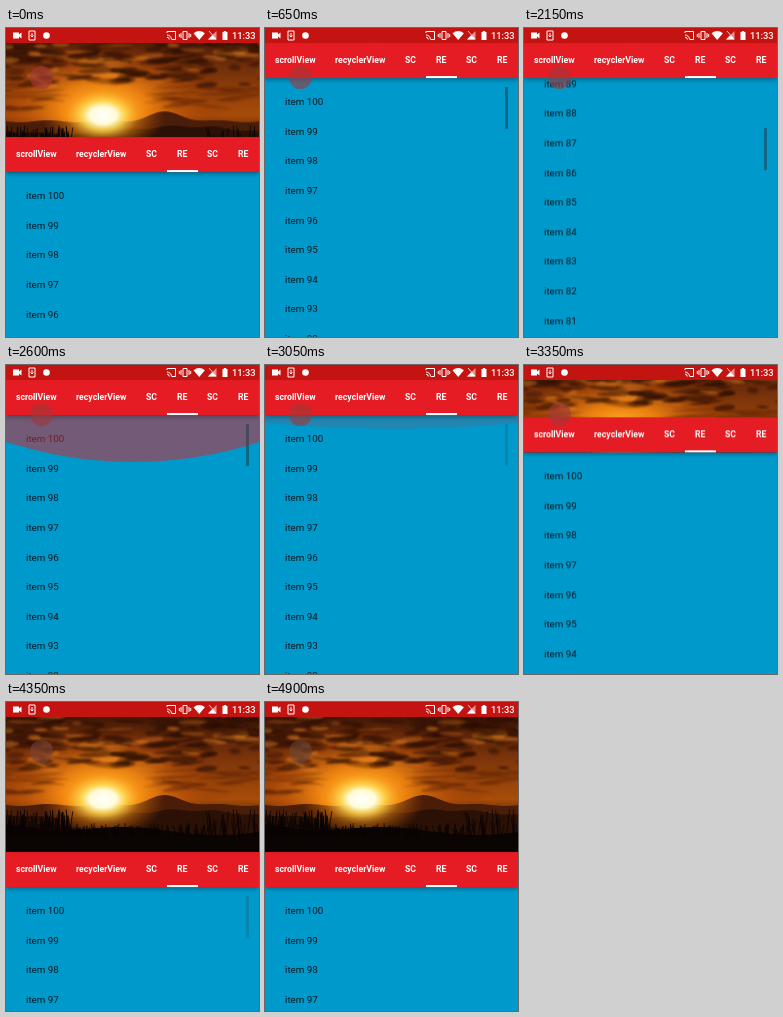
Animation, 253 px wide and 309 px high, one loop 4950 ms. Source, as an HTML page with a canvas:

```html
<!DOCTYPE html>
<html lang="en">
<head>
<meta charset="utf-8">
<title>Collapsing header</title>
<style>
  html, body { margin: 0; width: 100%; height: 100%; overflow: hidden; }
  body { position: relative; background: #000; font-family: Roboto, sans-serif; }
  .stage { position: absolute; left: 0; top: 0; width: 253px; height: 309px; overflow: hidden; }
  .stage * { position: absolute; box-sizing: border-box; }

  .photo, .sheet, .items, .thumb, .glow, .bubble {
    animation: 4950ms linear infinite;
  }
  .photo { left: 0; top: 0; animation-name: parallax; }
  .sheet { left: 0; top: 0; width: 253px; height: 330px; animation-name: slide; }

  .tabs {
    left: 0; top: 0; width: 253px; height: 35px; z-index: 1;
    background: #e51c23; box-shadow: 0 2px 5px rgba(0, 0, 0, .38);
    color: #fff; font-size: 8.7px; font-weight: 700; line-height: 35px;
  }
  .tabs span { top: 0; white-space: nowrap; }
  .tabs i { left: 161px; top: 33px; width: 31px; height: 2px; background: #fff; }

  .list { left: 0; top: 35px; width: 253px; height: 295px; overflow: hidden; background: #0099cc; }
  .items {
    left: 20px; top: 9.3px; color: #0b1a22; font-size: 9.8px; line-height: 29.6px;
    white-space: nowrap; animation-name: scroll;
  }
  .items div { position: static; height: 29.6px; }
  .thumb {
    left: 240px; top: 9px; width: 3px; height: 42px;
    background: rgba(35, 60, 72, .55); animation-name: thumb-move, thumb-fade;
    animation-duration: 4950ms; animation-iteration-count: infinite; animation-timing-function: linear;
  }
  .glow {
    left: 0; top: 0; width: 253px; height: 47px; overflow: hidden;
    transform-origin: top; animation-name: glow;
  }
  .glow div {
    left: -280.5px; bottom: 0; width: 814px; height: 814px;
    border-radius: 50%; background: rgba(229, 28, 35, .5);
  }

  .status { left: 0; top: 0; width: 253px; height: 15px; background: #c41411; }
  .status svg { left: 0; top: 0; }
  .clock { left: 226px; top: 0; color: #fff; font-size: 9.3px; font-weight: 500; line-height: 15px; }
  .bubble {
    left: 23.5px; top: 37.5px; width: 23px; height: 23px; border-radius: 50%;
    animation-name: bubble;
  }

  /* Header: collapse, stay pinned, then pull open again */
  @keyframes slide {
    0% { transform: translateY(110px); animation-timing-function: cubic-bezier(.2, .5, .5, 1); }
    5.05%, 64.65% { transform: translateY(15px); }
    67.68% { transform: translateY(52px); }
    71.72% { transform: translateY(125px); animation-timing-function: ease-out; }
    75.76%, 100% { transform: translateY(150px); }
  }
  @keyframes parallax {
    0% { transform: translateY(-9.5px); animation-timing-function: cubic-bezier(.2, .5, .5, 1); }
    5.05%, 64.65% { transform: translateY(-33px); }
    67.68% { transform: translateY(-24px); }
    71.72% { transform: translateY(-6px); animation-timing-function: ease-out; }
    75.76%, 100% { transform: translateY(0); }
  }
  @keyframes scroll {
    0%, 23.23% { transform: translateY(0); }
    28.28% { transform: translateY(-170px); }
    34.34% { transform: translateY(-335.6px); animation-timing-function: ease-out; }
    41.41% { transform: translateY(-375px); animation-timing-function: ease-in; }
    50.1%, 100% { transform: translateY(0); }
  }
  @keyframes thumb-move {
    0%, 23.23% { transform: translateY(0); }
    28.28% { transform: translateY(20px); }
    34.34% { transform: translateY(40px); animation-timing-function: ease-out; }
    41.41% { transform: translateY(45px); animation-timing-function: ease-in; }
    50.1%, 100% { transform: translateY(0); }
  }
  @keyframes thumb-fade {
    0%, 3.9% { opacity: 0; }
    4%, 13.13% { opacity: 1; }
    18.18%, 23.1% { opacity: 0; }
    23.23%, 58.59% { opacity: 1; }
    63.64%, 73.6% { opacity: 0; }
    73.74%, 84.85% { opacity: 1; }
    89.9%, 100% { opacity: 0; }
  }
  @keyframes glow {
    0%, 50.1% { transform: scaleY(0); opacity: 0; }
    51.5% { transform: scaleY(.8); opacity: .85; }
    52.53%, 54.5% { transform: scaleY(1); opacity: 1; }
    64.6%, 100% { transform: scaleY(0); opacity: 0; }
  }
  @keyframes bubble {
    0%, 82% { background: rgba(160, 55, 58, .6); }
    90%, 99.9% { background: rgba(105, 72, 58, .55); }
    100% { background: rgba(160, 55, 58, .6); }
  }
</style>
</head>
<body>
<div class="stage">
  <canvas class="photo" width="253" height="150"></canvas>

  <div class="sheet">
    <div class="tabs">
      <span style="left:10px">scrollView</span>
      <span style="left:70px">recyclerView</span>
      <span style="left:140px">SC</span>
      <span style="left:171px">RE</span>
      <span style="left:201px">SC</span>
      <span style="left:232px">RE</span>
      <i></i>
    </div>
    <div class="list">
      <div class="items"></div>
      <div class="glow"><div></div></div>
      <div class="thumb"></div>
    </div>
  </div>

  <div class="status">
    <svg width="253" height="15" fill="#fff">
      <path d="M7 4.5h6v2l2.5-2v6l-2.5-2v2H7z"/>
      <g fill="none" stroke="#fff">
        <path d="M23 3h6v9h-6zM26 5v4M24.5 7.5L26 9l1.5-1.5"/>
        <path d="M161 5V3.5h8.5v8H166M161 7a4.5 4.5 0 0 1 4.5 4.5M161 9.2a2.3 2.3 0 0 1 2.3 2.3"/>
        <path d="M177 3.5h4v8h-4zM175 5v5M183 5v5M173.3 6v3M184.7 6v3"/>
        <path d="M203 3l7 8" stroke-width=".8"/>
      </g>
      <circle cx="40.5" cy="7.5" r="3.3"/>
      <path d="M187.5 5.2q5.7-4.4 11.4 0L193.2 12z"/>
      <path d="M210.500 3v8.500h-8.500z" opacity=".55"/>
      <path d="M206 7.500l4.500 4h-8.500z"/>
      <path d="M216.500 4h1.300V3h2.400v1h1.300v8h-5z"/>
    </svg>
    <span class="clock">11:33</span>
  </div>
  <div class="bubble"></div>
</div>

<script>
  const items = document.querySelector('.items');
  for (let n = 100; n > 74; n--) {
    const row = document.createElement('div');
    row.textContent = 'item ' + n;
    items.append(row);
  }

  const ctx = document.querySelector('.photo').getContext('2d');
  let seed = 11;
  const random = () => (seed = (seed * 16807) % 2147483647) / 2147483647;
  const between = (a, b) => a + (b - a) * random();

  function fillGradient(gradient, stops) {
    stops.forEach(([at, color]) => gradient.addColorStop(at, color));
    ctx.fillStyle = gradient;
    ctx.fillRect(-300, -300, 900, 900);
  }

  function radial(x, y, radius, squash, stops) {
    ctx.save();
    ctx.translate(x, y);
    ctx.scale(1, squash);
    fillGradient(ctx.createRadialGradient(0, 0, 0, 0, 0, radius), stops);
    ctx.restore();
  }

  function cloud(x, y, width, height, color) {
    ctx.fillStyle = color;
    ctx.beginPath();
    ctx.ellipse(x, y, width, height, between(-.15, .15), 0, Math.PI * 2);
    ctx.fill();
  }

  function ridge(color, height) {
    ctx.fillStyle = color;
    ctx.beginPath();
    ctx.moveTo(0, 150);
    for (let x = 0; x <= 253; x++) ctx.lineTo(x, height(x));
    ctx.lineTo(253, 150);
    ctx.fill();
  }

  function paintSunset() {
    fillGradient(ctx.createLinearGradient(0, 0, 0, 150), [
      [0, '#301105'], [.25, '#62270a'], [.45, '#8a3c0a'], [.65, '#a84c08'], [.8, '#3a1606'], [1, '#0c0503']
    ]);
    radial(97, 88, 125, .55, [
      [0, 'rgba(255,190,50,1)'], [.35, 'rgba(245,140,20,.85)'], [.7, 'rgba(190,80,10,.4)'], [1, 'rgba(120,40,0,0)']
    ]);

    ctx.filter = 'blur(.8px)';
    for (let i = 0; i < 190; i++) {
      const y = between(12, 68);
      const bright = random() < .3;
      cloud(between(-10, 263), y, between(4, 20), between(1, 3.3),
        bright ? `rgba(235,135,35,${between(.2, .5)})` : `rgba(42,14,5,${between(.3, .7)})`);
    }
    for (let i = 0; i < 30; i++) {
      const side = random() < .5 ? between(-10, 45) : between(150, 263);
      cloud(side, between(66, 92), between(10, 30), between(.7, 2), 'rgba(80,28,5,.4)');
    }
    ctx.filter = 'none';

    ridge('#4a1d08', x => 103 - 9 * Math.exp(-(((x - 160) / 24) ** 2)) + Math.sin(x / 9));
    ridge('#2b1006', x => 112 + 4 * Math.sin(x / 38) + Math.sin(x / 7));
    radial(97, 97, 62, .65, [
      [0, '#fff'], [.22, '#fffbd8'], [.36, 'rgba(255,215,80,.9)'], [.6, 'rgba(255,150,20,.45)'], [1, 'rgba(220,90,0,0)']
    ]);
    ridge('#0a0403', x => 129 + 4 * Math.sin(x / 31 + 1) - 10 * Math.exp(-((x / 45) ** 2)));

    ctx.strokeStyle = '#0a0403';
    ctx.lineWidth = .8;
    for (let i = 0; i < 230; i++) {
      const x = random() < .6 ? between(0, 75) : between(75, 253);
      const tall = x < 65 || x > 200 ? between(8, 24) : between(3, 10);
      ctx.beginPath();
      ctx.moveTo(x, 135);
      ctx.lineTo(x + between(-4, 4), 131 - tall);
      ctx.stroke();
    }
  }

  paintSunset();
</script>
</body>
</html>
```
